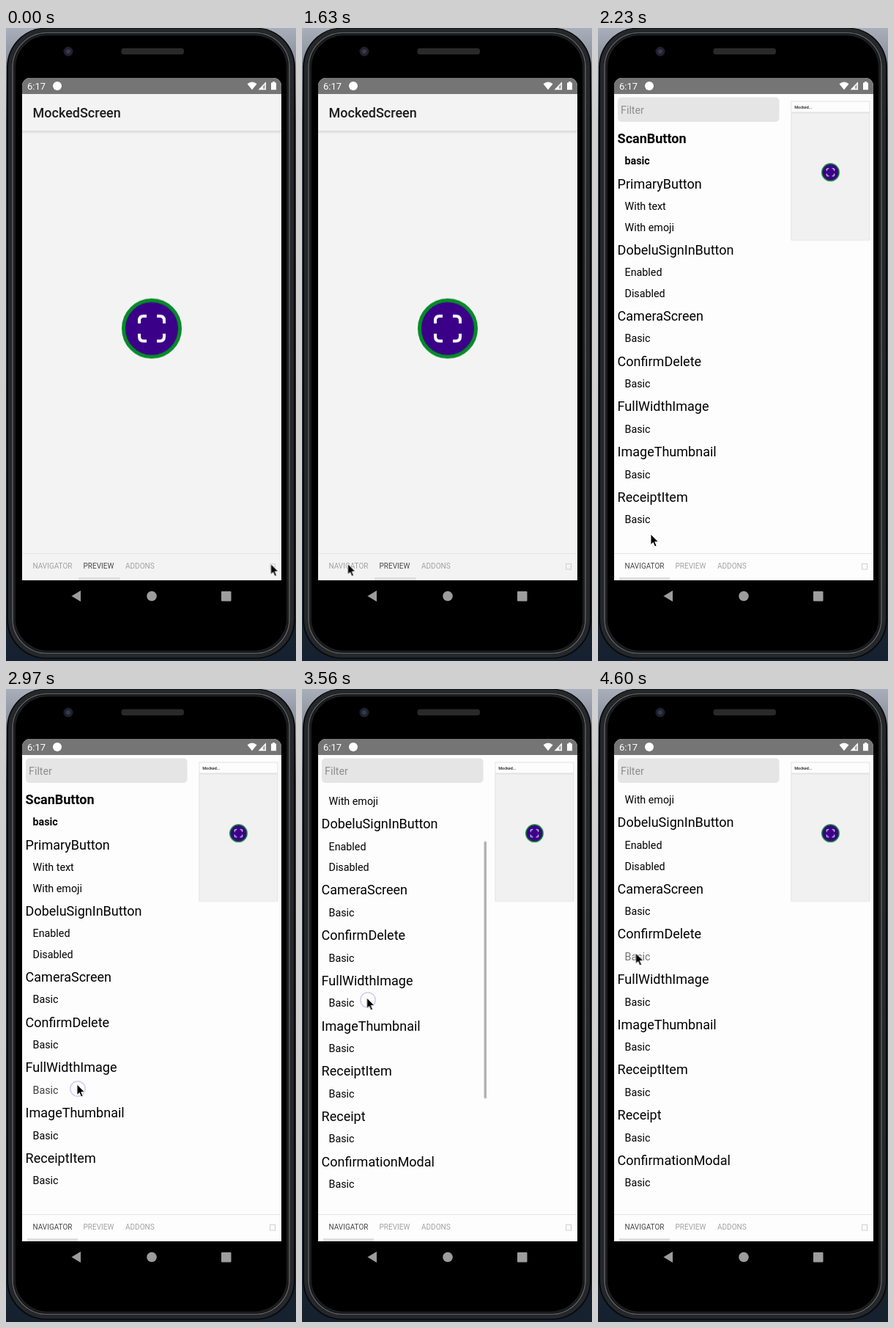
Write an HTML page that moves like this. It is 396 px wide and 863 px high and loops after 8000 ms.

```html
<!DOCTYPE html>
<html lang="en">
<head>
<meta charset="utf-8">
<title>Component navigator</title>
<style>
  html, body { margin: 0; width: 100%; height: 100%; overflow: hidden; background: #000; }
  svg { display: block; width: 396px; height: 863px; font-family: Roboto, sans-serif; }

  .anim { animation: 8s step-end -5ms infinite; }

  #cursor { animation-name: cursor; }
  @keyframes cursor {
    0% { transform: translate(361.5px, 730.5px); }
    1.875% { transform: translate(-50px, 731px); }
    7.5% { transform: translate(220px, 746px); }
    9.375% { transform: translate(150px, 743px); }
    11.125% { transform: translate(78px, 733px); }
    13% { transform: translate(62.5px, 730.5px); }
    27.875% { transform: translate(72px, 690px); }
    29.625% { transform: translate(90px, 590px); }
    31.5% { transform: translate(97px, 541px); }
    37.125% { transform: translate(97px, 539px); }
    39% { transform: translate(96px, 501px); }
    40.875% { transform: translate(93.5px, 456px); }
    42.625% { transform: translate(90px, 432px); }
    44.5% { transform: translate(88.5px, 421px); }
    50.125% { transform: translate(80px, 406px); }
    52% { transform: translate(68px, 388px); }
    53.75% { transform: translate(57px, 369px); }
    55.625% { transform: translate(52px, 361px); }
    57.5%, 100% { transform: translate(51.5px, 360px); }
  }

  #touch { animation-name: touch; }
  @keyframes touch {
    0% { transform: translate(-50px, 0); }
    16.75% { transform: translate(63px, 734.5px); }
    20.375% { transform: translate(-50px, 0); }
    35.25% { transform: translate(98px, 545px); }
    39% { transform: translate(97px, 512px); }
    40.875% { transform: translate(96px, 474px); }
    42.625% { transform: translate(92px, 440px); }
    44.5% { transform: translate(90px, 424px); }
    46.375%, 100% { transform: translate(-50px, 0); }
  }

  #preview { animation-name: shrink; }
  @keyframes shrink {
    0% { transform: translate(22px, 68px) scale(1); stroke: transparent; }
    24.125% { transform: translate(68px, 92px) scale(.867); stroke: #ccc; }
    26% { transform: translate(227.7px, 98.5px) scale(.407); stroke: #d4d4d4; }
    27.875%, 100% { transform: translate(264px, 100px) scale(.302); stroke: #e4e4e4; }
  }
  #body { animation-name: body; }
  @keyframes body {
    0% { height: 648px; fill: #f3f3f3; }
    24.125%, 100% { height: 627px; fill: #f1f1f1; }
  }
  #head { animation-name: head; }
  @keyframes head {
    0% { height: 72px; fill: #f3f3f3; }
    24.125% { height: 72px; fill: #fdfdfd; }
    27.875%, 100% { height: 50px; fill: #fdfdfd; }
  }
  #bar { animation-name: bar; }
  @keyframes bar {
    0% { transform: translate(0, 22px); }
    27.875%, 100% { transform: translate(0, 0); }
  }
  #scan { animation-name: scan; }
  @keyframes scan {
    0% { transform: translate(177px, 341.7px); }
    24.125% { transform: translate(177px, 331px); }
    27.875%, 100% { transform: translate(177px, 320px); }
  }
  #long { animation-name: long; }
  @keyframes long { 0% { opacity: 1; } 27.875%, 100% { opacity: 0; } }
  #short { animation-name: short; }
  @keyframes short { 0% { opacity: 0; } 27.875%, 100% { opacity: 1; } }

  #nav { animation-name: slide; }
  @keyframes slide {
    0% { transform: translate(-240px, 0); }
    24.125% { transform: translate(-187px, 0); }
    26% { transform: translate(-34.5px, 0); }
    27.875%, 100% { transform: translate(0, 0); }
  }
  #list { animation-name: scroll; }
  @keyframes scroll {
    0% { transform: translate(0, 0); }
    39% { transform: translate(0, -24px); }
    40.875% { transform: translate(0, -60.5px); }
    42.625% { transform: translate(0, -96px); }
    44.5% { transform: translate(0, -118.5px); }
    46.375%, 100% { transform: translate(0, -120.2px); }
  }
  #thumb { animation-name: thumb; }
  @keyframes thumb {
    0% { opacity: 0; }
    39% { opacity: 1; transform: translate(0, 15.3px); }
    40.875% { opacity: 1; transform: translate(0, 38.6px); }
    42.625% { opacity: 1; transform: translate(0, 61.2px); }
    44.5% { opacity: 1; transform: translate(0, 75.6px); }
    46.375% { opacity: 1; transform: translate(0, 76.7px); }
    52% { opacity: .5; transform: translate(0, 76.7px); }
    53.75%, 100% { opacity: 0; }
  }
  .drag { animation-name: drag; }
  @keyframes drag { 0% { opacity: 1; } 35.25% { opacity: .75; } 39%, 100% { opacity: 1; } }
  .press { animation-name: press; }
  @keyframes press { 0% { opacity: 1; } 57.5%, 100% { opacity: .55; } }

  #screen { animation-name: screen; }
  @keyframes screen { 0% { fill: #f3f3f3; } 24.125%, 100% { fill: #fdfdfd; } }
  #tabNav { animation-name: tabNav; }
  @keyframes tabNav {
    0% { fill: #a2a2a2; opacity: 1; }
    16.75% { fill: #a2a2a2; opacity: .5; }
    20.375% { fill: #a2a2a2; opacity: 1; }
    24.125%, 100% { fill: #484848; opacity: 1; }
  }
  #tabPrev { animation-name: tabPrev; }
  @keyframes tabPrev { 0% { fill: #484848; } 24.125%, 100% { fill: #a2a2a2; } }
  #line { animation-name: line; }
  @keyframes line {
    0% { x: 99px; width: 57px; }
    24.125%, 100% { x: 29px; width: 69px; }
  }
</style>
</head>
<body>
<svg viewBox="0 0 396 863">
  <defs>
    <linearGradient id="sky" x2="0" y2="1">
      <stop offset="0" stop-color="#a9afba"/>
      <stop offset=".06" stop-color="#858c98"/>
      <stop offset=".15" stop-color="#3d434d"/>
      <stop offset=".6" stop-color="#2a303a"/>
      <stop offset="1" stop-color="#15212f"/>
    </linearGradient>
    <linearGradient id="shade" x2="0" y2="1">
      <stop offset="0" stop-color="#d8d8d8"/>
      <stop offset="1" stop-color="#d8d8d8" stop-opacity="0"/>
    </linearGradient>
    <clipPath id="glass"><path d="M22 753V79A11 11 0 0 1 33 68H365A11 11 0 0 1 376 79V753Z"/></clipPath>
    <clipPath id="view"><rect x="22" y="132" width="231" height="550"/></clipPath>
  </defs>

  <!-- Phone -->
  <rect width="396" height="863" fill="url(#sky)"/>
  <rect x="1" y="-.5" width="394" height="860.5" rx="54" fill="#08090a"/>
  <g fill="none">
    <rect x="5.5" y="3" width="385" height="853" rx="50" stroke="#25272a" stroke-width="5"/>
    <rect x="9" y="6.5" width="378" height="846" rx="47" stroke="#5e6165" stroke-width="1.6"/>
    <rect x="11.5" y="9" width="373" height="841" rx="45" stroke="#1b1c1e" stroke-width="3"/>
  </g>
  <rect x="13" y="10.5" width="370" height="838" rx="44"/>
  <circle cx="85" cy="32" r="6.5" fill="#20212a"/>
  <circle cx="85" cy="32" r="3" fill="#343a55"/>
  <rect x="157.5" y="27.5" width="85.5" height="8.5" rx="3.5" fill="#292929"/>
  <g fill="#9d9d9d">
    <path d="M89.5 774.5 102 767V782Z"/>
    <circle cx="199" cy="774.5" r="6.8"/>
    <rect x="294" y="768" width="13.5" height="13.5" rx="1"/>
  </g>

  <g clip-path="url(#glass)">
    <rect id="screen" class="anim" x="22" y="68" width="354" height="685"/>

    <g id="nav" class="anim">
      <rect x="27" y="94.5" width="220.5" height="33.5" rx="5" fill="#e5e5e5"/>
      <text x="31" y="117" font-size="14.3" fill="#8e8e8e">Filter</text>
      <g clip-path="url(#view)">
        <g id="list" class="anim"></g>
        <rect id="thumb" class="anim" x="248.5" y="132.4" width="3.5" height="350" fill="#b3b3b3"/>
      </g>
    </g>

    <g id="preview" class="anim">
      <rect id="body" class="anim" width="354" vector-effect="non-scaling-stroke"/>
      <rect id="head" class="anim" width="354" vector-effect="non-scaling-stroke"/>
      <g stroke="none">
        <g id="bar" class="anim">
          <rect y="50" width="354" height="4.5" fill="url(#shade)"/>
          <g font-size="18" font-weight="500" fill="#1c1c1e">
            <text id="long" class="anim" x="14.5" y="32">MockedScreen</text>
            <text id="short" class="anim" x="14.5" y="32">Mocked...</text>
          </g>
        </g>
        <g id="scan" class="anim">
          <circle r="38.5" fill="#3b0088" stroke="#058a28" stroke-width="5"/>
          <path d="M-17-7V-11Q-17-17-11-17H-7M7-17H11Q17-17 17-11V-7M17 7V11Q17 17 11 17H7M-7 17H-11Q-17 17-17 11V7" fill="none" stroke="#fff" stroke-width="4"/>
        </g>
      </g>
    </g>

    <!-- Status bar -->
    <rect x="22" y="68" width="354" height="22" fill="#757575"/>
    <g fill="#fff">
      <text x="29" y="83.7" font-size="13">6:17</text>
      <circle cx="70" cy="79" r="6"/>
      <path d="M336 84.3 329.5 76.2Q336 70.8 342.5 76.2Z"/>
      <path d="M344.5 84.3 355 73.3V84.3Z"/>
      <path d="M350.8 82.8V79.6L353.6 76.7V82.8Z" fill="#a5a5a5"/>
      <path d="M362 74.5H364V73H367V74.5H369V84.3H362Z"/>
    </g>

    <!-- Tabs -->
    <rect x="22" y="716" width="354" height="1" fill="#e4e4e4"/>
    <rect id="line" class="anim" y="749" height="4" fill="#e0e0e0"/>
    <g font-size="10">
      <text id="tabNav" class="anim" x="36.5" y="737.2">NAVIGATOR</text>
      <text id="tabPrev" class="anim" x="105.5" y="737.2">PREVIEW</text>
      <text x="163" y="737.2" fill="#a2a2a2">ADDONS</text>
    </g>
    <rect x="360.5" y="730.5" width="7" height="7.5" fill="none" stroke="#cfcfcf"/>
  </g>

  <circle id="touch" class="anim" r="10.2" fill="none" stroke="#d0cfee" stroke-width="1.6"/>
  <path id="cursor" class="anim" d="M0 0V14.6L3.3 11.5 5.6 17 8.1 15.9 5.8 10.6H10.4Z" stroke="#fff" stroke-width=".9"/>
</svg>
<script>
  const stories = [
    ['ScanButton', 'basic'],
    ['PrimaryButton', 'With text', 'With emoji'],
    ['DobeluSignInButton', 'Enabled', 'Disabled'],
    ['CameraScreen', 'Basic'],
    ['ConfirmDelete', 'Basic'],
    ['FullWidthImage', 'Basic'],
    ['ImageThumbnail', 'Basic'],
    ['ReceiptItem', 'Basic'],
    ['Receipt', 'Basic'],
    ['ConfirmationModal', 'Basic']
  ];
  const pressed = { ConfirmDelete: 'anim press', FullWidthImage: 'anim drag' };
  const list = document.getElementById('list');

  function addText(label, x, y, size, weight, cls) {
    const el = document.createElementNS('http://www.w3.org/2000/svg', 'text');
    const attrs = { x, y, 'font-size': size, 'font-weight': weight, class: cls };
    for (const key in attrs) el.setAttribute(key, attrs[key]);
    el.textContent = label;
    list.append(el);
  }

  let y = 150.5;
  stories.forEach(([kind, ...items], i) => {
    const weight = i ? 400 : 700;
    addText(kind, 26.6, y + 6.3, 18, weight, '');
    y += 30.85;
    items.forEach((item, j) => {
      if (j) y += 28.5;
      addText(item, 36.5, y + 5, 14.3, weight, pressed[kind] || '');
    });
    y += 30.85;
  });
</script>
</body>
</html>
```
